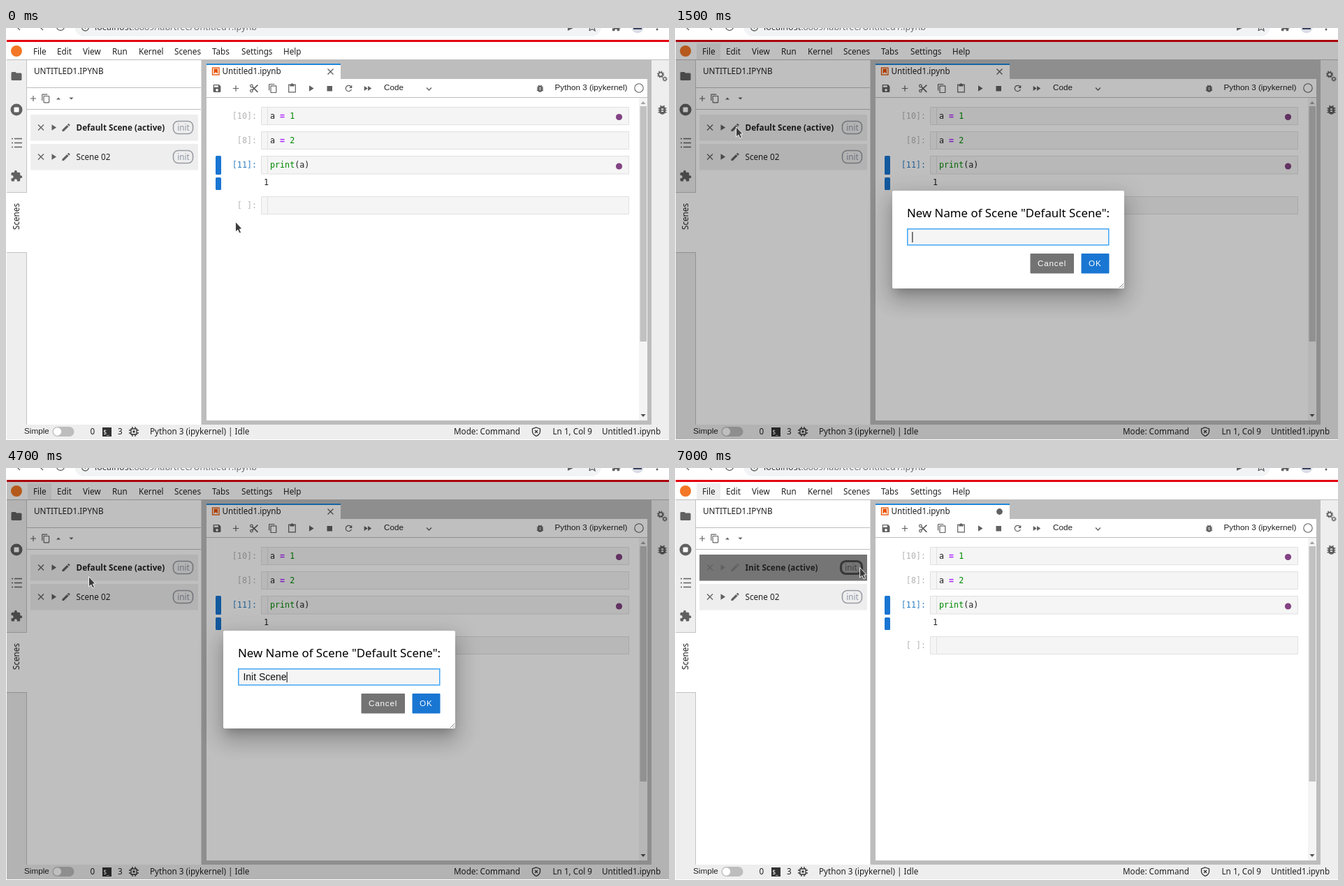
Recreate the animation shown at these times as an HTML page. Size 949 by 590 pixels, loop 8000 ms.

```html
<!DOCTYPE html>
<html lang="en">
<head>
<meta charset="utf-8">
<title>Renaming a scene</title>
<style>
  html, body { margin: 0; width: 100%; height: 100%; overflow: hidden; background: #fff; }
  svg { display: block; }
  #stage { position: absolute; left: 0; top: 0; }
  text { font: 11.7px "Noto Sans", sans-serif; fill: #212121; white-space: pre; }
  .arial { font-family: "Liberation Sans", Arial, sans-serif; }
  .code { font-family: "DejaVu Sans Mono", monospace; }
  .prompt { fill: #b4b4b4; text-anchor: end; }
  .icon { fill: #616161; }
  .line { fill: none; stroke: #616161; stroke-width: 1.3; }
  .thick { fill: none; stroke: #616161; stroke-width: 2; }
  .editor { fill: #f5f5f5; stroke: #e0e0e0; }
  .num { fill: #080; }
  .op { fill: #a2f; font-weight: bold; }
  .row rect { fill: #eee; }
  .row .pill { fill: none; stroke: #999ca3; stroke-width: 1.6; }
  .row .tag { fill: #8f97a6; text-anchor: middle; }
  .row.hover .back { fill: #757575; }
  .row.hover .pill { stroke: #454545; }
  .row.hover .tag { fill: #424242; }
  .row .pill.hot { stroke: #383838; stroke-width: 3.2; }
  #dialog {
    position: absolute; left: 311px; top: 233px; width: 332px; height: 140px;
    background: #fff; border-radius: 2px;
    box-shadow: 0 9px 12px -5px rgba(0,0,0,.2), 0 18px 28px 3px rgba(0,0,0,.14), 0 7px 34px 6px rgba(0,0,0,.12);
  }
  #dialog .title { font-size: 16.85px; fill: #000; }
  #dialog .button { fill: #fff; letter-spacing: .8px; }
  #typed { font-size: 14px; fill: #111; }
</style>
</head>
<body>
<svg id="stage" width="949" height="590" viewBox="0 0 949 590">
  <defs>
    <g id="add"><path d="M-7-1h6v-6h2v6h6v2h-6v6h-2v-6h-6z"/></g>
    <g id="save" transform="translate(-12 -12)"><path d="M17 3H5c-1.1 0-2 .9-2 2v14c0 1.1.9 2 2 2h14c1.1 0 2-.9 2-2V7zm-5 16a3 3 0 1 1 0-6 3 3 0 0 1 0 6zm3-10H5V5h10z"/></g>
    <g id="cut" class="thick"><circle cx="-6" cy="-6" r="3"/><circle cx="-6" cy="6" r="3"/><path d="M-4-4 9 9M-4 4 9-8" stroke-width="2.8"/></g>
    <g id="copy" transform="translate(-12 -12)"><path d="M16 1H4c-1.1 0-2 .9-2 2v14h2V3h12zm3 4H8c-1.1 0-2 .9-2 2v14c0 1.1.9 2 2 2h11c1.1 0 2-.9 2-2V7c0-1.1-.9-2-2-2zm0 16H8V7h11z"/></g>
    <g id="paste"><path class="thick" d="M-8-9H8V9H-8z"/><path d="M-5-9h2a3 3 0 0 1 6 0h2v4H-5z"/></g>
    <g id="play"><path d="M-5-7v14L6 0z"/></g>
    <g id="forward"><path d="M-8-6v12L.5 0zM1-6v12l8.5-6z"/></g>
    <g id="reload" transform="translate(-12 -12)"><path d="M17.65 6.35A8 8 0 1 0 19.73 14h-2.08A6 6 0 1 1 16.22 7.78L13 11h7V4z"/></g>
    <g id="bug"><path class="thick" d="M-8-3H8M-8 1H8M-8 5H8M-4-8l3 3M4-8l-3 3"/><rect x="-6" y="-7" width="12" height="16" rx="6"/><path d="M-2-1h4M-2 3h4" stroke="#fff" stroke-width="2"/></g>
    <g id="folder" transform="translate(-12 -12)"><path d="M10 4H4a2 2 0 0 0-2 2v12c0 1.1.9 2 2 2h16c1.1 0 2-.9 2-2V8a2 2 0 0 0-2-2h-8z"/></g>
    <g id="puzzle" transform="translate(-12 -12)"><path d="M20.5 11H19V7a2 2 0 0 0-2-2h-4V3.5a2.5 2.5 0 0 0-5 0V5H4a2 2 0 0 0-2 2v3.8h1.5a2.7 2.7 0 0 1 0 5.4H2V20c0 1.1.9 2 2 2h3.8v-1.5a2.7 2.7 0 0 1 5.4 0V22H17a2 2 0 0 0 2-2v-4h1.5a2.5 2.5 0 0 0 0-5z"/></g>
    <g id="edit" transform="translate(-12 -12)"><path d="M3 17.25V21h3.75L17.8 9.94l-3.75-3.75zM20.7 7.04a1 1 0 0 0 0-1.41l-2.33-2.34a1 1 0 0 0-1.41 0l-1.83 1.83 3.75 3.75z"/></g>
    <g id="cross"><path class="line" d="M-4-4 4 4M4-4-4 4"/></g>
    <g id="gear"><circle r="3.3" class="thick"/><circle r="5" class="line" stroke-dasharray="2 1.93"/></g>
    <g id="rowIcons" class="icon">
      <use href="#cross" transform="translate(50 18.5)"/>
      <use href="#play" transform="translate(68.5 18.5) scale(.6)"/>
      <use href="#edit" transform="translate(86 18.5) scale(.62)"/>
    </g>
  </defs>

  <rect width="949" height="590" fill="#fff"/>

  <!-- browser bar -->
  <rect x="98" y="-16" width="754" height="28" rx="14" fill="#f1f3f4"/>
  <path class="line" d="M20 3l-5-5M48-2l5 5"/>
  <circle class="line" cx="78" cy="-2" r="5.5"/>
  <circle class="line" cx="113.500" cy="-1" r="5"/>
  <path class="line" d="M113.500-3v4"/>
  <text x="127" y="3" style="font-size:12.6px;fill:#6a6d71"><tspan fill="#333">localhost</tspan>:8889/lab/tree/Untitled1.ipynb</text>
  <path class="icon" d="M804-6v10l10-5z"/>
  <path class="line" d="M835 4l4-2.500 4 2.500-1-5M835 4l1-5"/>
  <use href="#puzzle" class="icon" transform="translate(874 -2) scale(.62)"/>
  <circle cx="904" cy="-1" r="8.500" fill="#dadde6"/>
  <path d="M898-5h12v7h-12z" fill="#3b4260"/>
  <circle class="icon" cx="932" cy="2" r="1.500"/>

  <!-- application frame -->
  <rect x="1" y="17" width="948" height="3" fill="#e3000f"/>
  <rect x="1" y="45" width="948" height="1" fill="#bdbdbd"/>
  <rect x="1" y="46" width="29" height="522" fill="#eee"/>
  <rect x="1" y="236" width="29" height="86" fill="#fff"/>
  <path d="M1 235.500h29M1 321.500h29M29.500 46v190M29.500 321v247" stroke="#c4c4c4"/>
  <rect x="279.500" y="46" width="645" height="522" fill="#bdbdbd"/>
  <rect x="924" y="46" width="25" height="522" fill="#eee"/>
  <rect x="1" y="568" width="948" height="21" fill="#eee"/>

  <!-- menu -->
  <rect id="fileMark" x="31" y="22" width="34" height="23" fill="#eee"/>
  <circle cx="15" cy="33" r="8" fill="#f37726"/>
  <text y="38"><tspan x="39">File</tspan><tspan x="73">Edit</tspan><tspan x="110">View</tspan><tspan x="152">Run</tspan><tspan x="190">Kernel</tspan><tspan x="241">Scenes</tspan><tspan x="295">Tabs</tspan><tspan x="337">Settings</tspan><tspan x="397">Help</tspan></text>

  <!-- side bars -->
  <g class="icon">
    <use href="#folder" transform="translate(15 69) scale(.75)"/>
    <circle cx="15" cy="117" r="8.500"/><rect x="11.500" y="113.500" width="7" height="7" rx="1" fill="#fff"/>
    <path d="M8 158.500h2m2 0h11M8 164.500h2m2 0h11M8 170.500h2m2 0h11" stroke="#616161" stroke-width="1.700"/>
    <use href="#puzzle" transform="translate(15 212) scale(.75)"/>
    <use href="#gear" transform="translate(937 66.500) scale(.9)"/>
    <use href="#gear" transform="translate(943 73) scale(.65)"/>
    <use href="#bug" transform="translate(939.500 117) scale(.75)"/>
  </g>
  <text transform="translate(19 289) rotate(-90)">Scenes</text>

  <!-- scenes panel -->
  <text x="40" y="66">UNTITLED1.IPYNB</text>
  <path d="M30 85.500h249M30 116.500h249" stroke="#bdbdbd"/>
  <g class="icon">
    <use href="#add" transform="translate(39 101) scale(.58)"/>
    <use href="#copy" transform="translate(57 101) scale(.58)"/>
    <path d="M72 102.500h6l-3-3zM90.500 99.500h6l-3 3z"/>
  </g>
  <g class="row" id="row1" transform="translate(0 124)">
    <rect class="back" x="35" width="240" height="37.500"/>
    <use href="#rowIcons"/>
    <text id="name" x="100.500" y="22.500" font-weight="bold" style="font-weight:bold">Default Scene (active)</text>
    <rect class="pill" id="pill" x="239.500" y="9.500" width="28" height="18" rx="7" style="fill:none"/>
    <text class="tag" id="tag" x="254" y="22.500">init</text>
  </g>
  <g class="row" id="row2" transform="translate(0 166)">
    <rect class="back" x="35" width="240" height="37.500"/>
    <use href="#rowIcons"/>
    <text x="100.500" y="22.500">Scene 02</text>
    <rect class="pill" x="239.500" y="9.500" width="28" height="18" rx="7" style="fill:none"/>
    <text class="tag" x="254" y="22.500">init</text>
  </g>

  <!-- notebook -->
  <rect x="287" y="73" width="631" height="489" fill="#fff"/>
  <rect x="287" y="52" width="192" height="22" fill="#fff"/>
  <rect x="287" y="51" width="192" height="2" fill="#2187d8"/>
  <rect x="295.500" y="57" width="9.500" height="10" fill="none" stroke="#e65100" stroke-width="1.300"/>
  <path d="M297.500 58.500h5.500v7l-2.700-2.200-2.800 2.200z" fill="#e65100"/>
  <text x="309.500" y="66">Untitled1.ipynb</text>
  <use id="close" href="#cross" transform="translate(464.500 62.500)"/>
  <circle id="dirty" class="icon" cx="464.500" cy="62.500" r="4.400"/>
  <path d="M287 99.500h631" stroke="#bdbdbd"/>
  <g class="icon">
    <use href="#save" transform="translate(302 86.500) scale(.6)"/>
    <use href="#add" transform="translate(329 86.500) scale(.6)"/>
    <use href="#cut" transform="translate(355 86.500) scale(.6)"/>
    <use href="#copy" transform="translate(382 86.500) scale(.6)"/>
    <use href="#paste" transform="translate(409.500 86.500) scale(.6)"/>
    <use href="#play" transform="translate(437 86.500) scale(.6)"/>
    <rect x="459.500" y="83" width="7.500" height="7.500"/>
    <use href="#reload" transform="translate(490.500 86.500) scale(.6)"/>
    <use href="#forward" transform="translate(517.500 86.500) scale(.6)"/>
    <use href="#bug" transform="translate(764.500 86.500) scale(.58)"/>
  </g>
  <text class="arial" y="89"><tspan x="541">Code</tspan><tspan x="785.500">Python 3 (ipykernel)</tspan></text>
  <path class="line" d="M602 85.500l3.500 3.500 3.500-3.500"/>
  <circle class="line" cx="906" cy="86" r="6.200" style="stroke-width:1.1"/>

  <g class="editor">
    <path d="M365.500 113.500h526v25h-526zM365.500 148.500h526v25h-526zM365.500 183.500h526v25.500h-526zM365.500 241.500h526v25h-526z"/>
    <path d="M374.500 113v25M374.500 148v25M374.500 183v25M374.500 241v25"/>
  </g>
  <g fill="#1976d2"><rect x="300" y="183" width="8" height="27" rx="1.500"/><rect x="300" y="214" width="8" height="18" rx="1.500"/></g>
  <text class="code prompt" x="359" y="129.500">[10]:</text>
  <text class="code prompt" x="359" y="164.500">[8]:</text>
  <text class="code prompt" x="359" y="200" style="fill:#307fc1">[11]:</text>
  <text class="code prompt" x="359" y="257.500">[ ]:</text>
  <text class="code" x="378" y="129.500">a <tspan class="op">=</tspan> <tspan class="num">1</tspan></text>
  <text class="code" x="378" y="164.500">a <tspan class="op">=</tspan> <tspan class="num">2</tspan></text>
  <text class="code" x="378" y="200"><tspan class="num">print</tspan>(a)</text>
  <text class="code" x="369" y="225">1</text>
  <g fill="#824283"><circle cx="877.500" cy="127.500" r="4.600"/><circle cx="877.500" cy="198" r="4.600"/></g>

  <rect x="906" y="100" width="12" height="462" fill="#f4f4f4"/>
  <rect x="907.500" y="112" width="9.500" height="337" fill="#c1c1c1"/>
  <path d="M908.500 109h7l-3.500-4z" fill="#a3a3a3"/>
  <path d="M908.500 553h7l-3.500 4z" fill="#505050"/>

  <!-- status bar -->
  <text class="arial" x="26" y="581">Simple</text>
  <rect x="66.500" y="571" width="31" height="14" rx="7" fill="#bdbdbd"/>
  <circle cx="73.500" cy="578" r="5.700" fill="#fff"/>
  <rect x="138" y="572" width="13" height="13" fill="#333"/>
  <text x="139.500" y="581.500" style="font-size:8px;fill:#fff">$_</text>
  <path class="line" d="M179 574h8v8h-8zM181 571v3M185 571v3M181 582v3M185 582v3M176 576h3M176 580h3M187 576h3M187 580h3" style="stroke:#333"/>
  <rect x="181.500" y="576.500" width="3" height="3" fill="#333"/>
  <path class="line" d="M759 572l5.500 2v4c0 3-2.500 5-5.500 6.500-3-1.500-5.500-3.500-5.500-6.500v-4zM757 576l4 4M761 576l-4 4" style="stroke:#333"/>
  <text y="582"><tspan x="120.500">0</tspan><tspan x="160">3</tspan><tspan x="206">Python 3 (ipykernel) | Idle</tspan><tspan x="641">Mode: Command</tspan><tspan x="782.500">Ln 1, Col 9</tspan><tspan x="853">Untitled1.ipynb</tspan></text>

  <rect id="shade" x="1" y="17" width="948" height="572" fill="#000" fill-opacity=".25"/>
  <g id="cursor" fill="#3b3b3b" stroke="#fff" stroke-width=".9" stroke-linejoin="round">
    <path id="arrow" d="M.5.500v14.500l3.300-2.900 2.200 4.800 2.500-1.100-2.200-4.700 3.700-.400z"/>
    <path id="hand" d="M0 0c1-1 2.500-1 3 .5L4.500 5.500l3 .2c1.500.3 1.800 1 1.800 2.300l-.8 5.500-1 1.500H-.5l-3-3.700-3.300-2.600c-.7-1 .4-2 1.500-1.600L-2 9Z"/>
  </g>
</svg>

<div id="dialog">
  <svg width="332" height="140" viewBox="311 233 332 140">
    <text class="title" x="332" y="271">New Name of Scene "Default Scene":</text>
    <rect x="332.750" y="287.750" width="288" height="23" fill="#f5f5f5" stroke="#42a5f5" stroke-width="1.500"/>
    <text class="arial" id="typed" x="339.400" y="304"></text>
    <rect id="caret" y="292" width="1" height="15" fill="#000"/>
    <rect x="508.500" y="323" width="62.500" height="28.500" rx="1" fill="#737373"/>
    <rect x="581.500" y="323" width="40" height="28.500" rx="1" fill="#1976d2"/>
    <text class="arial button" x="519" y="341">Cancel</text>
    <text class="arial button" x="592" y="341">OK</text>
    <path d="M636 372l6-6M639.500 372l2.500-2.500" stroke="#777" stroke-width=".9"/>
  </svg>
</div>

<script>
  const LOOP = 8000, OPEN = 1500, CLOSE = 5000;
  const $ = id => document.getElementById(id);

  // each entry: start time, then the values held until the next entry
  const moves = [
    [0, 328, 277], [300, 316, 271], [400, 265, 240], [500, 190, 197], [600, 134, 169],
    [700, 107, 155], [800, 94, 147], [900, 89, 143], [1100, 88, 142], [1300, 87, 141],
    [2000, 101, 147], [2100, 118, 155], [6100, 127, 173], [6200, 140, 232], [6300, 156, 300],
    [6400, 175, 335], [6500, 203, 295], [6600, 228, 232], [6700, 246, 182], [6800, 258, 153], [6900, 264, 142]
  ];
  const typing = [
    [0, ''], [3100, 'I'], [3200, 'In'], [3300, 'Ini'], [3500, 'Init'], [4100, 'Init S'],
    [4400, 'Init Sc'], [4500, 'Init Sce'], [4600, 'Init Scen'], [4700, 'Init Scene']
  ];

  const at = (track, time) => track.findLast(entry => entry[0] <= time) || track[0];
  const show = (id, on) => { $(id).style.display = on ? '' : 'none'; };

  function draw(time) {
    const open = time >= OPEN && time < CLOSE, renamed = time >= CLOSE;
    const [, x, y] = at(moves, time);
    const hand = time >= 6100 && time < 6200;

    $('cursor').setAttribute('transform', `translate(${x} ${y})`);
    show('arrow', !hand);
    show('hand', hand);

    // hover styling trails the pointer by one step
    const [, , hoverY] = at(moves, time - 100);
    const canHover = !open && !(time >= CLOSE && time < CLOSE + 100);
    $('row1').classList.toggle('hover', canHover && hoverY >= 124 && hoverY < 162);
    $('row2').classList.toggle('hover', canHover && hoverY >= 166 && hoverY < 204);

    const hot = time >= 6900, pill = $('pill');
    pill.classList.toggle('hot', hot);
    pill.setAttribute('x', hot ? 237.5 : 239.5);
    pill.setAttribute('width', hot ? 30 : 28);
    $('tag').setAttribute('x', hot ? 252 : 254);

    show('fileMark', time >= 1200);
    show('shade', open);
    show('dialog', open);
    show('close', !renamed);
    show('dirty', renamed);
    $('name').textContent = (renamed ? 'Init' : 'Default') + ' Scene (active)';

    if (open) {
      const typed = $('typed');
      typed.textContent = at(typing, time)[1];
      $('caret').setAttribute('x', 339.4 + (typed.textContent ? typed.getComputedTextLength() : 0));
      show('caret', time < 2000 || time >= 2800);
    }
  }

  const start = performance.now();
  function tick() {
    draw((performance.now() - start) % LOOP);
    requestAnimationFrame(tick);
  }
  tick();
</script>
</body>
</html>
```
